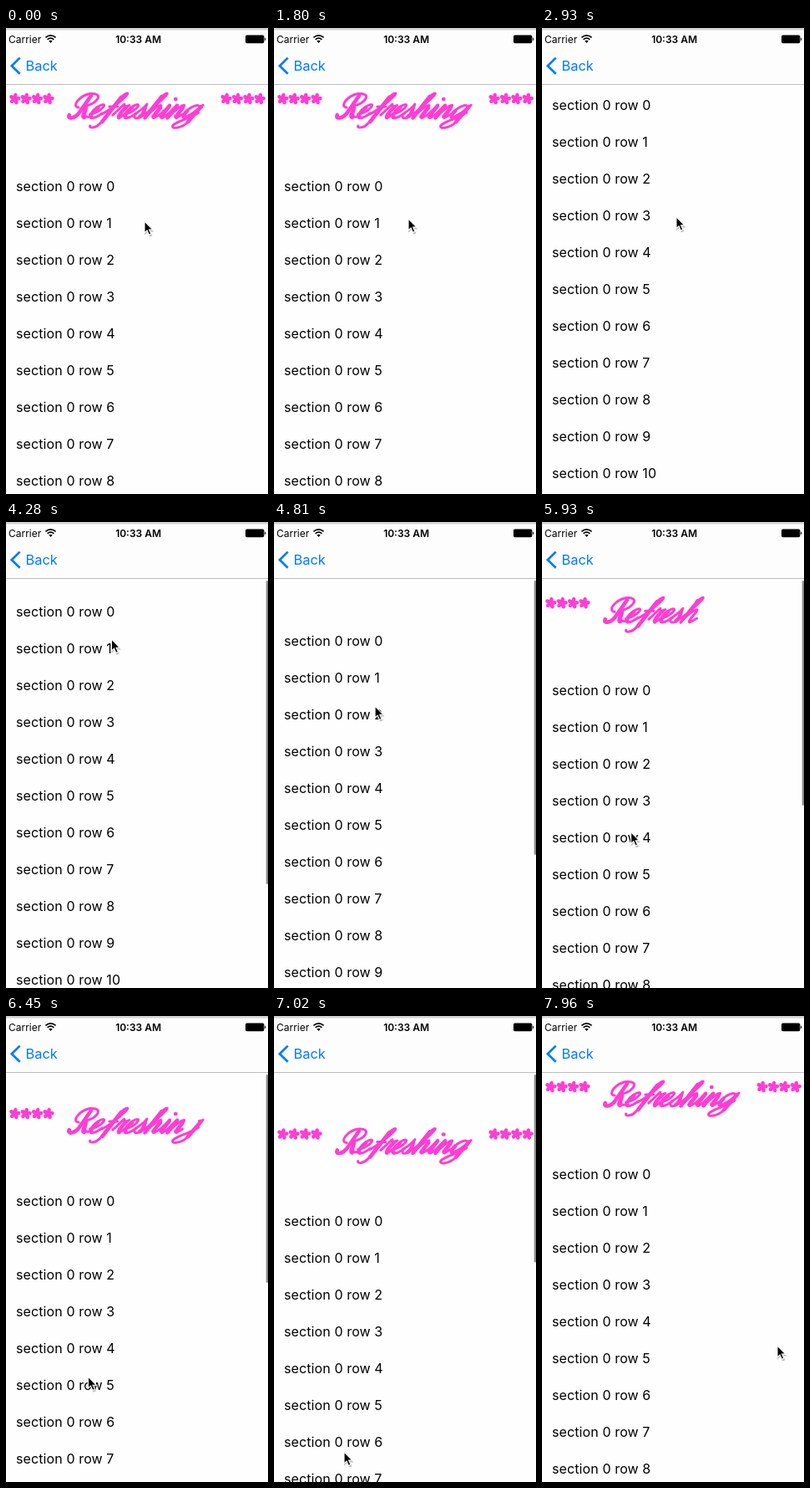
Recreate the animation shown at these times as an HTML page. Size 314 by 557 pixels, loop 8 s.

```html
<!DOCTYPE html>
<html lang="en">
<head>
<meta charset="utf-8">
<title>Pull to refresh</title>
<style>
  html, body { margin: 0; width: 100%; height: 100%; overflow: hidden; background: #fefefe; }
  svg { display: block; width: 314px; height: 557px; font-family: Inter, Roboto, sans-serif; }
  .row { font-size: 16px; letter-spacing: 0.11px; }
  .status { font-size: 12px; }
  .ink path { fill: none; stroke: #ff3dd4; stroke-linecap: round; stroke-linejoin: round; }
</style>
</head>
<body>
<svg viewBox="0 0 314 557" xmlns="http://www.w3.org/2000/svg">
  <rect width="314" height="557" fill="#fefefe"/>
  <g id="list"><g id="ink" class="ink"></g></g>
  <rect id="bar" x="311.7" y="70" width="2.3" rx="1.1" fill="#8e8e8e"/>

  <g id="nav">
    <rect width="314" height="67" fill="#fdfdfd"/>
    <rect width="314" height="2.5" fill="#d2d2d2"/>
    <rect y="67" width="314" height="1" fill="#bdbdbd"/>
    <text class="status" x="3" y="17.8">Carrier</text>
    <g fill="none" stroke="#000" stroke-width="1.7">
      <path d="M47.4,11.4 Q53.5,6.4 59.6,11.4"/>
      <path d="M49.6,13.8 Q53.5,10.6 57.4,13.8"/>
    </g>
    <path d="M51.3,15.6 Q53.5,14 55.7,15.6 L53.5,18 Z"/>
    <text class="status" x="158.6" y="17.5" text-anchor="middle" font-weight="600">10:33 AM</text>
    <rect x="287" y="8.5" width="22.3" height="9.8" rx="1.8"/>
    <path d="M310,11.3 Q312.4,13.4 310,15.5 Z"/>
    <path d="M16.6,35.6 L6.8,45.2 L16.6,54.8" fill="none" stroke="#007aff" stroke-width="2.7"/>
    <text x="23.5" y="51.4" font-size="16.4" fill="#007aff">Back</text>
  </g>

  <g id="cursor">
    <path d="M0,1.5 V16.5 L3.4,13.5 L6,18.5 L9.5,17.2 L7.4,12.4 H11.5 Z" fill="#000" opacity=".25"/>
    <path d="M0,0 V13.8 L3.1,11 L5.4,16.3 L7.9,15.2 L5.6,10.1 H9.9 Z" stroke="#fff" stroke-width="1.1"/>
  </g>
</svg>
<script>
const LOOP = 8000, REST = 97, PULLED = 158, DRAG_START = 3950, RELEASE = 7440;
const NS = 'http://www.w3.org/2000/svg';
const $ = id => document.getElementById(id);
const add = (parent, tag, attrs) => {
  const el = document.createElementNS(NS, tag);
  for (const k in attrs) el.setAttribute(k, attrs[k]);
  return parent.appendChild(el);
};
const clamp = (v, lo = 0, hi = 1) => Math.min(hi, Math.max(lo, v));
const span = (t, a, b) => clamp((t - a) / (b - a));
const smooth = u => u * u * (3 - 2 * u);
const easeOut = u => 1 - (1 - u) ** 3;

for (let i = 0; i < 14; i++) {
  add($('list'), 'text', { class: 'row', x: 12, y: 194.7 + 44 * i }).textContent = `section 0 row ${i}`;
}

// Script letters in upright coordinates; "!" marks a heavy stroke.
const E = 'M0,-5 C9,-6 13,-16 8,-16.5 C1,-16 -1,0 6,-0.5 C9,-0.5 12,-3 14,-6|!M4,-13 C1,-9 1,-2 5,-1';
const letters = [
  [71, 'M7,-13 C-3,-14 -2,-27 9,-29.5 C26,-31 26,-17 14,-15 C19,-14 18,0 27,-2|!M12,-27 L12,-6 C11,1 3,1 2,-4|!M15,-14 C18,-12 17,-2 22,-1'],
  [97, E],
  [111, 'M0,-5 C8,-10 18,-31 13,-30 C7,-29 8,-8 6,6 C5,12 -3,12 -4,9|M3,-14 L13,-14|!M9.5,-25 L7,4'],
  [125, 'M0,-4 C3,-10 4,-16 5,-17 C6,-13 9,-14 12,-15.5 C8,-12 7,0 10,-0.5 L14,-5|!M9.5,-13 C7.5,-8 7.5,-2 9.5,-1'],
  [138, E],
  [151, 'M0,-5 C4,-10 6,-15 6,-17 C8,-10 11,-5 9,-2 C7,1 2,0 1,-3|!M7,-12 C9,-8 10,-4 8,-2'],
  [162, 'M-1,-3 C5,-9 13,-30 10,-30 C4,-30 4,-5 4,0 C5,-9 10,-16 13,-15.5 C16,-14 10,0 15,-0.5 L20,-5|!M6.5,-26 L4,-1|!M14,-13 L13,-2'],
  [181, 'M0,-4 L4.5,-16 C3,-6 3,0 6,-0.5 L10,-5|!M4.5,-15 L3.5,-2|!M6,-23 L6.3,-23'],
  [190, 'M0,-4 C2,-9 3,-16 4.5,-16 L3,0 C5,-9 10,-17 13,-15.5 C15,-14 10,0 14,-0.5 L18,-5|!M4.5,-15 L3,-1|!M13,-12 L12,-2'],
  [208, 'M17,-16 L13,4 C11,13 -3,13 -2,8 C1,2 12,1 18,-7|!M16,-14 L13,4|M14,-14 C9,-19 1,-11 2,-5 C4,2 11,-4 15,-12|!M3,-9 C1,-5 3,-1 5,-1']
];

const strokes = [];
let total = 0;
function ink(d, width) {
  const el = add($('ink'), 'path', { d, 'stroke-width': width });
  const len = el.getTotalLength();
  strokes.push({ el, len, from: total });
  total += len;
}
function slant(d, x0) {
  return d.replace(/(-?[\d.]+),(-?[\d.]+)/g, (_, x, y) =>
    `${(+x + x0 - 0.7 * y).toFixed(2)},${(+y + 108).toFixed(2)}`);
}
function flower(cx, cy) {
  const at = (r, a) => `${(cx + r * Math.sin(a)).toFixed(2)},${(cy - r * Math.cos(a)).toFixed(2)}`;
  let d = `M${cx},${cy}`;
  for (let i = 0; i < 5; i++) {
    const a = i * Math.PI * 0.4 + 0.2;
    d += ` C${at(8.8, a - 0.48)} ${at(8.8, a + 0.48)} ${cx},${cy}`;
  }
  ink(d, 2.4);
}
const flowers = x => { for (let i = 0; i < 4; i++) flower(x + 13.4 * i, 84.6); };

const marks = {};
flowers(10.5);
letters.forEach(([x, glyph], i) => {
  glyph.split('|').forEach((d, j) => {
    const heavy = d[0] === '!';
    ink(slant(heavy ? d.slice(1) : d, x), heavy ? 4.6 : 3);
    if (i === 9 && j === 1) marks.tail = total;
  });
  if (i === 2) marks.f = total;
});
flowers(263.8);

// Drawn length grows in step with the pull distance.
const rate = (marks.tail - marks.f) / 40;
const drawnAt = pull => marks.f + (pull - 89) * rate;

function showInk(length) {
  for (const { el, len, from } of strokes) {
    const part = clamp(length - from, 0, len);
    el.style.visibility = part > 0.05 ? 'visible' : 'hidden';
    el.style.strokeDasharray = part < len ? `${part} 9999` : 'none';
  }
}

const pulls = [[DRAG_START, 0], [4120, 4], [4280, 15], [5400, 89], [6450, 129], [7020, 153.5], [7260, PULLED]];
const moves = [
  [2690, 161, 228], [2930, 161, 226], [3400, 137, 128], [3520, 137, 128], [DRAG_START, 128, 111],
  [4120, 127, 118], [4280, 126.5, 140], [5400, 115, 309], [6450, 98.5, 431], [7020, 84, 521],
  [7260, 82, 538], [7500, 82, 538], [7960, 282, 394]
];
const hops = [[0, 166, 231], [600, 156, 231], [780, 161, 238], [1260, 160, 233], [1320, 160, 229], [1800, 161, 228]];

function along(keys, t) {
  let i = 0;
  while (i < keys.length - 2 && t >= keys[i + 1][0]) i++;
  const [a, b] = [keys[i], keys[i + 1]];
  const u = span(t, a[0], b[0]);
  return a.slice(1).map((v, k) => v + (b[k + 1] - v) * u);
}

function pullAt(t) {
  if (t < DRAG_START) return REST * (1 - smooth(span(t, 2650, 2920)));
  if (t < RELEASE) return along(pulls, t)[0];
  return PULLED + (REST - PULLED) * easeOut(span(t, RELEASE - 20, RELEASE + 380));
}

function cursorAt(t) {
  if (t >= 2690) return along(moves, t);
  return hops.filter(h => h[0] <= t).pop().slice(1);
}

function render(t) {
  const pull = pullAt(t);
  $('list').setAttribute('transform', `translate(0 ${(pull - REST).toFixed(2)})`);
  showInk(t < DRAG_START || t > 7260 ? total : drawnAt(pull));
  $('bar').setAttribute('height', Math.max(0, 378 - pull));
  $('bar').setAttribute('opacity', t < DRAG_START ? 0 : 1 - span(t, 7700, 7900));
  const [x, y] = cursorAt(t);
  $('cursor').setAttribute('transform', `translate(${x.toFixed(2)} ${y.toFixed(2)})`);
}

const start = performance.now();
function tick() {
  render((performance.now() - start) % LOOP);
  requestAnimationFrame(tick);
}
tick();
</script>
</body>
</html>
```
